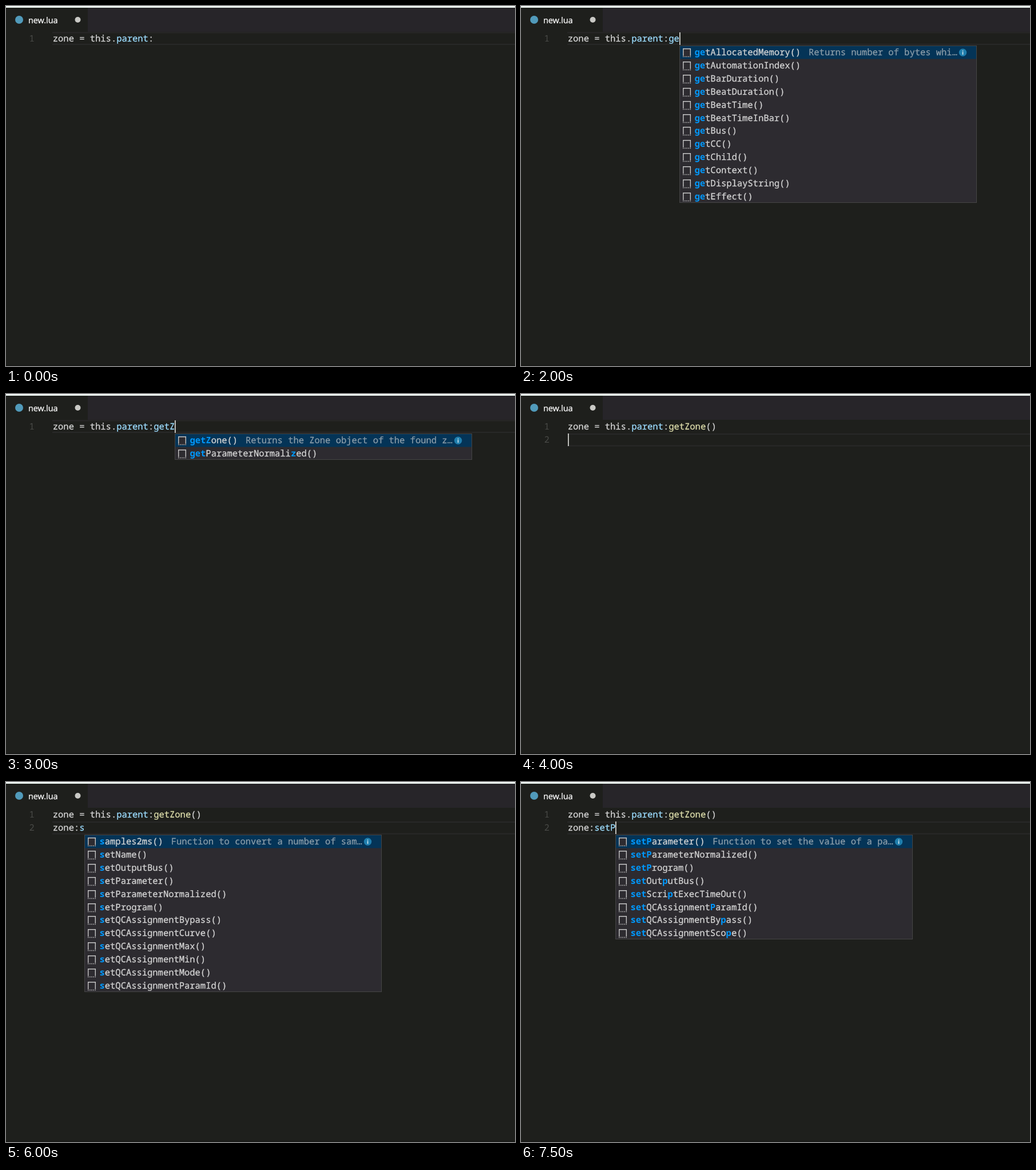
An HTML page that plays this animation: 890 by 629 pixels, repeating every 8 s.

```html
<!DOCTYPE html>
<html lang="en">
<head>
<meta charset="utf-8">
<title>Code completion</title>
<style>
  html, body { margin: 0; width: 100%; height: 100%; overflow: hidden; background: #1e1f1c; }
  svg { display: block; width: 890px; height: 629px; }
  text { white-space: pre; text-rendering: geometricPrecision; }
  text, tspan { fill: currentColor; stroke: currentColor; stroke-width: 0.3; }
  .code { font: 15.48px "Noto Sans Mono", "DejaVu Sans Mono", monospace; color: #d4d4d4; }
  .tab { font: 14.4px "Open Sans", "Noto Sans", sans-serif; color: #fff; }
  .num { color: #4a4b48; stroke-width: 0; }
  .prop { color: #9cdcfe; }
  .func { color: #dcdcaa; }
  .match { color: #0097fb; font-weight: 700; stroke-width: 0; }
  .desc { color: #8b9ca8; }
</style>
</head>
<body>
<svg viewBox="0 0 890 629">
  <rect width="890" height="629" fill="#1e1f1c"/>
  <rect x="143" y="3" width="747" height="42" fill="#272529"/>
  <rect width="890" height="3" fill="#edf6f0"/>
  <rect y="627" width="890" height="2" fill="#191a18"/>
  <circle cx="23" cy="24" r="7" fill="#519aba"/>
  <text class="tab" x="39" y="30">new.lua</text>
  <circle cx="125.5" cy="24" r="5" fill="#c9c9c5"/>
  <g id="editor"></g>
</svg>
<script>
const LOOP = 8000;
const CHAR = 9.288, LEFT = 81.8, LINE = 22.9;
const POPUP_WIDTH = 520, POPUP_FILL = "#2d2b30";
const editor = document.getElementById("editor");

const getters = ["AllocatedMemory", "AutomationIndex", "BarDuration", "BeatDuration",
  "BeatTime", "BeatTimeInBar", "Bus", "CC", "Child", "Context", "DisplayString", "Effect"]
  .map(name => `get${name}()`);
const assign = name => `setQCAssignment${name}()`;
const setters = ["setName()", "setOutputBus()", "setParameter()", "setParameterNormalized()",
  "setProgram()", ...["Bypass", "Curve", "Max", "Min", "Mode", "ParamId"].map(assign)];
const setList = [...setters, assign("Scope")];

const memoryHint = "Returns number of bytes whi…";
const nameHint = "Function to set the name of the elemen…";

const span = (cls, s) => `<tspan class="${cls}">${s}</tspan>`;
const text = (x, y, s, cls = "") => `<text class="code ${cls}" x="${x}" y="${y}">${s}</text>`;
const rect = (x, y, w, h, fill) =>
  `<rect x="${x}" y="${y}" width="${w}" height="${h}" fill="${fill}"/>`;

const head = "zone = this." + span("prop", "parent") + ":";
const call = head + span("func", "getZone") + "()";

// Steps while a word is typed on the first or second line
const first = (at, word, items, hint) =>
  ({ at, row: 0, cols: 19 + word.length, lines: [head + span("prop", word)],
     caret: word !== "", word, items, hint });
const second = (at, word, items, hint, caret = true) =>
  ({ at, row: 1, cols: 5 + word.length, lines: [call, "zone:" + span("prop", word)],
     caret, word, items, hint });

const steps = [
  first(0, ""),
  first(1500, "g", getters, memoryHint),
  first(2000, "ge", getters, memoryHint),
  first(2500, "get", getters, memoryHint),
  first(3000, "getZ", ["getZone()", "getParameterNormalized()"],
    "Returns the Zone object of the found z…"),
  { at: 3500, row: 0, cols: 28, lines: [call], caret: true },
  { at: 4000, row: 1, cols: 0, lines: [call, ""], caret: true },
  second(5000, "", null, "", false),
  second(6000, "s", ["samples2ms()", ...setters],
    "Function to convert a number of sam…", false),
  second(6500, "se", setList, nameHint),
  second(7000, "set", setList, nameHint),
  second(7500, "setP",
    ["setParameter()", "setParameterNormalized()", "setProgram()", "setOutputBus()",
     "setScriptExecTimeOut()", ...["ParamId", "Bypass", "Scope"].map(assign)],
    "Function to set the value of a pa…")
];

// Marks the letters of the typed word, in order, inside a label
function highlight(label, word) {
  let n = 0, out = "", run = "";
  const flush = () => { if (run) out += span("match", run); run = ""; };
  for (const c of label) {
    if (n < word.length && c.toLowerCase() === word[n].toLowerCase()) {
      run += c;
      n++;
    } else {
      flush();
      out += c;
    }
  }
  flush();
  return out;
}

function itemIcon(x, y) {
  return rect(x, y, 14, 15, POPUP_FILL) +
    `<g fill="none" stroke="#c5c5c5" stroke-width="1.4">
    <path d="M${x + 0.7} ${y + 13}V${y + 0.7}H${x + 13.3}V${y + 13}"/>
    <path d="M${x} ${y + 14.5}h14" stroke-dasharray="1.5 1.6"/></g>`;
}

function infoIcon(x, y) {
  return `<circle cx="${x}" cy="${y}" r="6.7" fill="#1f7ead"/>` +
    rect(x - 0.8, y - 3.7, 1.6, 1.6, "#d5e6ee") +
    rect(x - 0.8, y - 1.2, 1.6, 5, "#d5e6ee");
}

function popup({ row, cols, items, word, hint }) {
  const top = row ? 92 : 69;
  const left = Math.round(LEFT + cols * CHAR - 0.2);
  const height = Math.round(items.length * LINE);
  let out = rect(left, top, POPUP_WIDTH, height, POPUP_FILL) +
    rect(left, top + 0.5, POPUP_WIDTH, 23, "#043457");
  items.forEach((label, i) => {
    const y = top + i * LINE;
    out += itemIcon(left + 6, Math.round(y + 5)) +
      text(left + 26.5, y + 17, highlight(label, word));
  });
  out += text(left + 40.3 + items[0].length * CHAR, top + 17, hint, "desc") +
    infoIcon(left + POPUP_WIDTH - 24.5, top + 12.3);
  return out + `<rect x="${left + 0.5}" y="${top + 0.5}" width="${POPUP_WIDTH - 1}"
    height="${height - 1}" fill="none" stroke="#454545"/>`;
}

function draw(step) {
  const top = step.row ? 69 : 45.5;
  let out = rect(81, top, 809, 2, "#282828") + rect(81, top + 20.5, 809, 2, "#282828");
  step.lines.forEach((line, i) => {
    const y = 62 + i * 23;
    out += text(40.5, y, i + 1, "num") + text(LEFT, y, line);
  });
  if (step.caret) {
    const x = Math.round(LEFT + step.cols * CHAR);
    out += rect(x, step.row ? 69 : 46, 1.6, 22, "#e4e4e0");
  }
  if (step.items) out += popup(step);
  editor.innerHTML = out;
}

const start = performance.now();
let shown;
function tick() {
  const t = (performance.now() - start) % LOOP;
  const step = steps.findLast(s => s.at <= t);
  if (step !== shown) draw(shown = step);
  requestAnimationFrame(tick);
}
tick();
</script>
</body>
</html>
```
